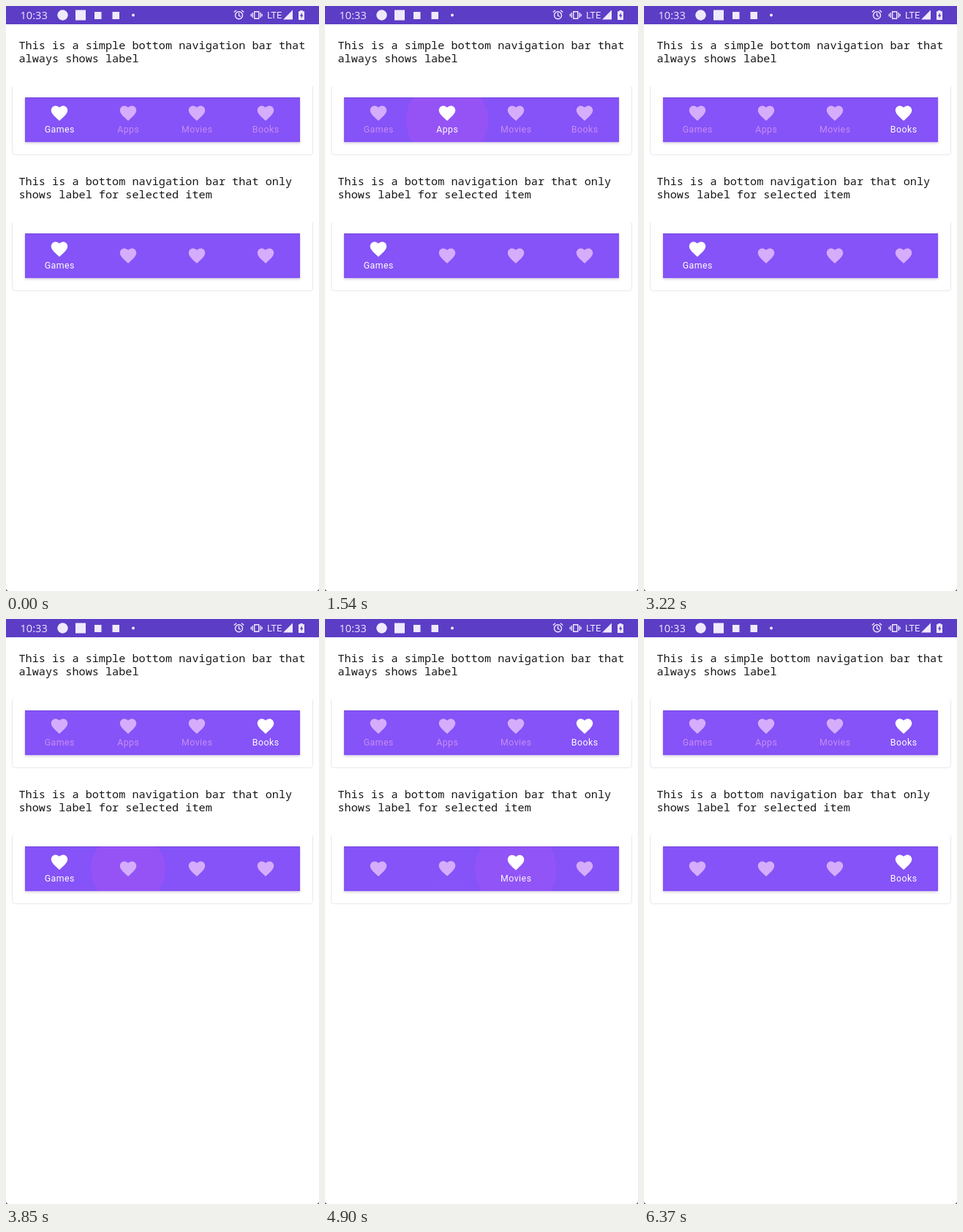
These frames come from a looping animation (428x800 px, 6.44 s). An HTML page:

```html
<!DOCTYPE html>
<html lang="en">
<head>
<meta charset="utf-8">
<title>Bottom navigation</title>
<style>
  html, body { margin: 0; width: 100%; height: 100%; overflow: hidden; background: #fff; }
  svg { display: block; width: 100vw; height: 100vh; }
  .note { font: 500 15.2px "Noto Sans Mono", monospace; fill: #161616; white-space: pre; }
  .label { font: 12.3px Roboto, sans-serif; letter-spacing: .5px; text-anchor: middle; }
  .card { fill: none; stroke: #e8e8ea; }
  .bar { fill: #8552f7; }
  .status { fill: #efeafb; }
  .line { fill: none; stroke: #efeafb; stroke-width: 1.4; }
</style>
</head>
<body>
<svg id="stage" viewBox="0 0 428 800">
  <defs>
    <path id="heart" d="M12 21.35l-1.45-1.32C5.4 15.36 2 12.28 2 8.5 2 5.42 4.42 3 7.5 3c1.74 0 3.41.81 4.5 2.09C13.09 3.81 14.76 3 16.5 3 19.58 3 22 5.42 22 8.5c0 3.78-3.4 6.86-8.55 11.54z" transform="scale(1.125) translate(-12 -12.17)"/>
    <filter id="shadow" x="-5%" y="-20%" width="110%" height="150%">
      <feDropShadow dx="0" dy="1.5" stdDeviation="1.8" flood-color="#54358f" flood-opacity=".3"/>
    </filter>
  </defs>
  <rect width="428" height="800" fill="#fff"/>
  <rect width="428" height="25" fill="#5c3dc6"/>
  <g class="status">
    <text x="19.5" y="18" font-family="Open Sans, sans-serif" font-size="14.6" font-weight="500">10:33</text>
    <circle cx="77.5" cy="12.5" r="7.2"/>
    <rect x="95" y="5.5" width="14" height="14"/>
    <rect x="121" y="8" width="9.5" height="10"/>
    <rect x="145.500" y="8" width="9.5" height="10"/>
    <circle cx="174" cy="12.5" r="2"/>
    <g class="line">
      <circle cx="318.500" cy="12.800" r="5"/>
      <path d="M318.500 9.500v3.500l2.500 1.500M311.800 8.500l3.200-2.800M325.200 8.500l-3.200-2.800"/>
      <path d="M339.700 7.700h6v9.600h-6zM337.300 9v7M348.100 9v7M335.300 10.800v3.400M350.100 10.800v3.400"/>
    </g>
    <text x="357" y="17.300" font-family="Roboto, sans-serif" font-size="13">LTE</text>
    <path d="M392 5.500v13h-13z"/>
    <path d="M402.300 6v1.300H400v11.700h8V7.300h-2.300V6z"/>
    <path d="M404.700 9l-2.700 4.800h1.700v3.200l2.700-4.800h-1.700z" fill="#5c3dc6"/>
  </g>
  <path d="M0 797v3h3q-2.500-.5-3-3M428 797v3h-3q2.500-.5 3-3" fill="#555"/>
</svg>
<script>
const LOOP = 6440, STEP = 70;
const NAMES = ["Games", "Apps", "Movies", "Books"];
const SELECT_DELAY = 180, SHIFT_TIME = 115;
const stage = document.getElementById("stage");
const clamp = v => Math.max(0, Math.min(1, v));

function add(parent, tag, attrs, text) {
  const el = document.createElementNS("http://www.w3.org/2000/svg", tag);
  for (const key in attrs) el.setAttribute(key, attrs[key]);
  if (text) el.textContent = text;
  parent.append(el);
  return el;
}

// taps: [time, item index]
function makeBar(y, lines, labelled, taps) {
  lines.forEach((text, i) =>
    add(stage, "text", { class: "note", x: 17.5, y: y - 66 + i * 17.9 }, text));
  add(stage, "path", { class: "card", d: `M8.500 ${y - 15}V${y + 74.5}q0 4 4 4H415.500q4 0 4-4V${y - 15}` });
  add(stage, "rect", { class: "bar", x: 26, y, width: 376, height: 61, filter: "url(#shadow)" });
  add(stage, "rect", { x: 26, y, width: 376, height: 1, fill: "#7445dc" });
  const clip = add(stage, "clipPath", { id: "clip" + y });
  add(clip, "rect", { x: 26, y, width: 376, height: 61 });
  const group = add(stage, "g", { "clip-path": `url(#clip${y})` });
  const ripples = taps.map(([, i]) =>
    add(group, "circle", { cx: 73 + 94 * i, cy: y + 31, fill: "#ce58f2" }));
  const items = NAMES.map((name, i) => ({
    x: 73 + 94 * i,
    icon: add(stage, "use", { href: "#heart" }),
    label: add(stage, "text", { class: "label", x: 73.25 + 94 * i }, name)
  }));

  return t => {
    taps.forEach(([start], i) => {
      const age = t - start;
      ripples[i].setAttribute("r", 28 + 28 * clamp(age / 196));
      ripples[i].setAttribute("opacity", .21 * clamp(age / 70) * clamp((410 - age) / 170));
    });

    let now = 0, before = 0, since = -LOOP;
    for (const [start, i] of taps) {
      if (t >= start + SELECT_DELAY) {
        before = now;
        now = i;
        since = start + SELECT_DELAY;
      }
    }
    const p = clamp((t - since) / SHIFT_TIME);
    const ease = p * p * (3 - 2 * p);
    items.forEach(({ x, icon, label }, i) => {
      const active = i === now;
      const shown = active ? ease : i === before ? 1 - ease : 0;
      const drop = labelled ? 0 : 9 * (1 - shown);
      icon.setAttribute("transform", `translate(${x} ${y + 21.7 + drop})`);
      icon.setAttribute("fill", active ? "#fff" : "#d6adfc");
      label.setAttribute("y", y + 47.7 + drop);
      label.setAttribute("fill", active ? "#fff" : "#c98cf6");
      label.setAttribute("opacity", labelled ? 1 : shown);
    });
  };
}

const bars = [
  makeBar(125, ["This is a simple bottom navigation bar that", "always shows label"],
    true, [[1310, 1], [2170, 3]]),
  makeBar(311, ["This is a bottom navigation bar that only", "shows label for selected item"],
    false, [[3690, 1], [4620, 2], [5640, 3]])
];

const begin = performance.now();
function draw(now) {
  const t = Math.max(0, now - begin) % LOOP;
  const held = Math.floor(t / STEP) * STEP;
  bars.forEach(bar => bar(held));
  requestAnimationFrame(draw);
}
draw(begin);
</script>
</body>
</html>
```
